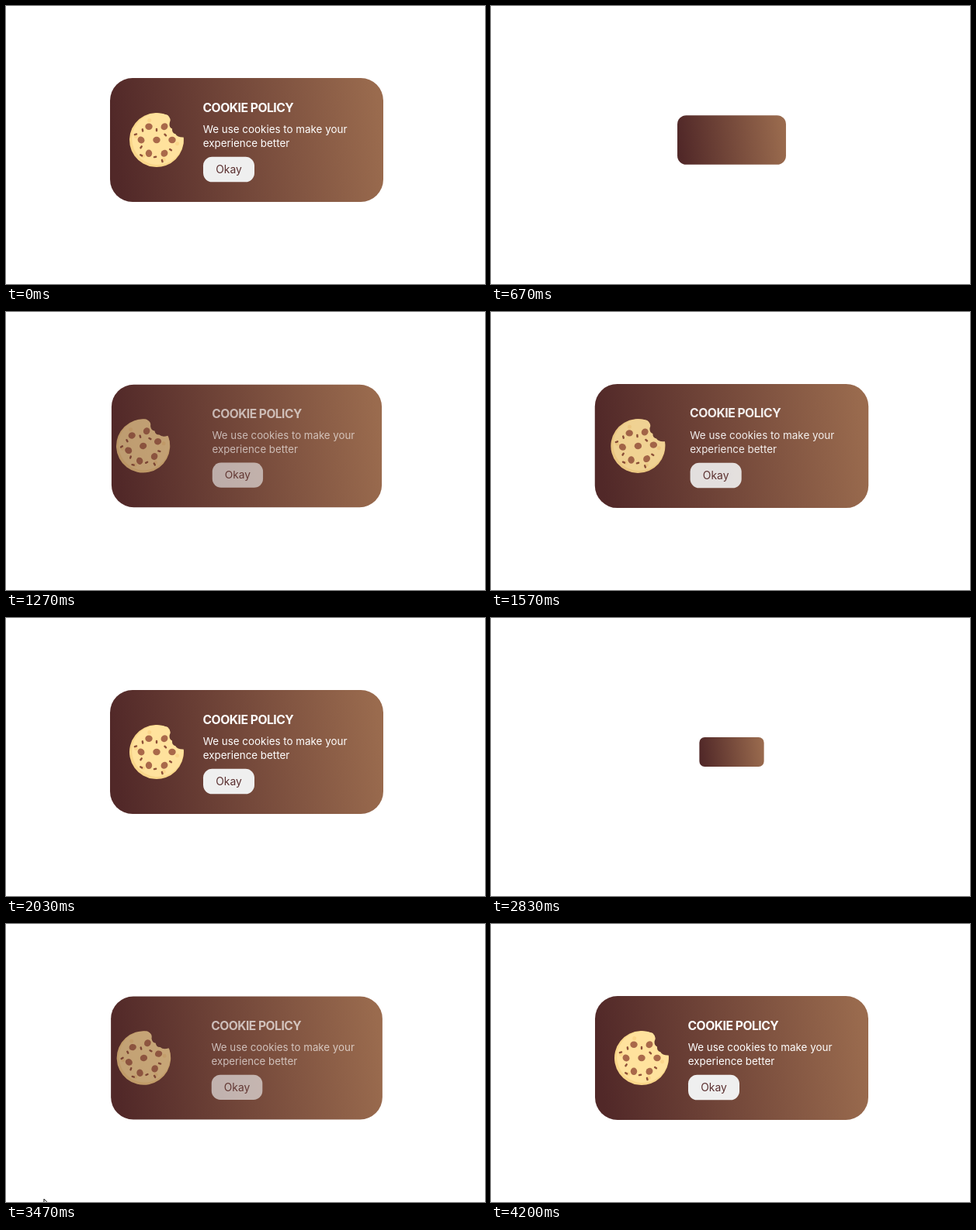
Write an HTML page that moves like this. It is 617 by 359 pixels and loops after 4.36 s.

```html
<!DOCTYPE html>
<html lang="en">
<head>
<meta charset="utf-8">
<title>Cookie policy card</title>
<style>
  html, body { margin: 0; height: 100%; overflow: hidden; background: #fff; }
  svg { display: block; width: 100vw; height: 100vh; }
  text { font: 13.4px Inter, "Open Sans", sans-serif; fill: #fff; }
  .title { font-size: 15.7px; font-weight: 700; letter-spacing: -.5px; }
  .label { font-size: 13.9px; fill: #5a2f2f; }
</style>
</head>
<body>
<svg viewBox="0 0 617 359">
  <defs>
    <linearGradient id="cocoa" gradientUnits="userSpaceOnUse" x1="140" y1="190" x2="482" y2="146">
      <stop stop-color="#512828"/>
      <stop offset="1" stop-color="#9a6b4e"/>
    </linearGradient>
    <path id="dough" d="M13.500-32.300Q19-27 16-22Q15-16 19.500-14Q19-8 24-7Q27-2 34.900-2.500A35 35 0 1 1 13.500-32.300Z"/>
    <ellipse id="chip" rx="4.700" ry="4.200" fill="#a9694a"/>
    <rect id="crumb" x="-2.300" y="-1.200" width="4.600" height="2.400" rx="1.100" fill="#8f5139"/>
    <circle id="dimple" r="2.500" fill="#fbd68b"/>
  </defs>
  <g id="card">
    <rect x="134" y="93" width="352" height="160" rx="29" fill="url(#cocoa)"/>
    <g id="cookie">
      <use href="#dough" fill="#f9d68a"/>
      <use href="#dough" fill="#ffe29d" transform="translate(1.500 -1.200) scale(.95)"/>
      <g id="bits"></g>
    </g>
    <g id="copy">
      <text class="title" x="253.500" y="136.500">COOKIE POLICY</text>
      <text x="253.700" y="164.300">We use cookies to make your</text>
      <text x="253.700" y="182.300">experience better</text>
      <rect x="254" y="194.800" width="66" height="32.500" rx="11.500" fill="#efefef"/>
      <text class="label" x="287" y="215.800" text-anchor="middle">Okay</text>
    </g>
  </g>
  <path id="pointer" d="M0 0V16L3.700 12.600L6 18L8.500 17L6.200 11.600H11Z" fill="#fff" stroke="#111"/>
</svg>
<script>
const LOOP = 4360, CYCLE = LOOP / 2, START = 618;
const $ = id => document.getElementById(id);
const clamp = v => Math.min(1, Math.max(0, v));
const elasticOut = u => u >= 1 ? 1 : 1 - 2 ** (-10 * u) * Math.cos(4 * Math.PI * u);
const remaining = u => (1 - u) ** 3;

// Copies of a shape on an arc around the cookie's centre, 60 degrees apart
function ring(shape, count, radius, from) {
  return Array.from({ length: count }, (_, i) =>
    `<use href="#${shape}" transform="rotate(${from + 60 * i}) translate(${radius} 0) rotate(${75 * i})"/>`).join("");
}
$("bits").innerHTML =
  ring("dimple", 5, 27, 10) +
  ring("chip", 1, 0, 0) + ring("chip", 6, 20, 0) +
  ring("crumb", 4, 22, 35) + ring("crumb", 3, 28, 75) + ring("crumb", 2, 13, 270);

function pose(id, transform, opacity = 1) {
  $(id).setAttribute("transform", transform);
  $(id).setAttribute("opacity", opacity);
}

function draw(now) {
  const time = now % LOOP;
  const t = (time - START + LOOP) % CYCLE;
  const scale = elasticOut(clamp(t / 1135));
  const left = remaining(clamp((t - 350) / 1090));
  pose("card", `translate(310 173) scale(${scale}) translate(-310 -173)`);
  pose("cookie", `translate(${194 - 50 * left} 173) rotate(${-45 * left})`, 1 - left);
  pose("copy", `translate(${30 * left} 0)`, 1 - left);

  // The pointer sweeps in from the left and leaves through the bottom
  const q = (time - 3230) / 270;
  const inside = q > 0 && q < 1;
  pose("pointer", `translate(${-8 + 57 * (1 - (1 - q) ** 3)} ${320 + 44 * q * q})`, inside ? 1 : 0);
}

const begin = performance.now();
function tick() {
  draw(performance.now() - begin);
  requestAnimationFrame(tick);
}
tick();
</script>
</body>
</html>
```
